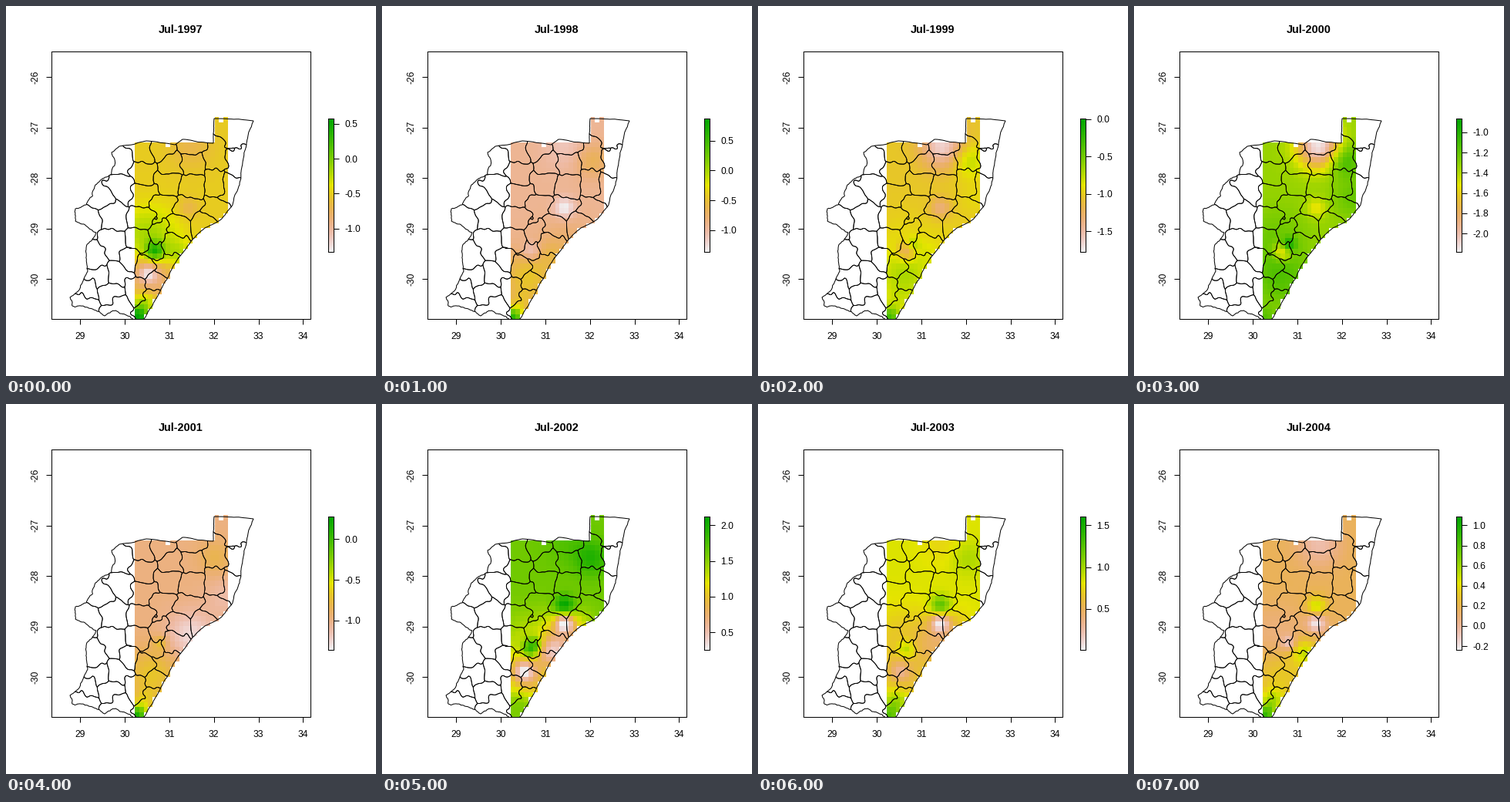
A matplotlib script for the animation above (8 s loop, 480 by 480 pixels).

```python
import colorsys
import math

import matplotlib.pyplot as plt
import numpy as np
from matplotlib.animation import FuncAnimation
from matplotlib.colors import ListedColormap
from matplotlib.patches import Polygon

SIZE = 480
PX = 0.75  # points per pixel at 96 dpi
BOX = (59, 59, 395, 406)  # map frame: left, top, right, bottom
YEARS = range(1997, 2005)

plt.rcParams["font.family"] = "Liberation Sans"
rng = np.random.default_rng(5)


def terrain(n=255):
    """White through peach and yellow to green."""
    cols = []
    for u in np.linspace(0, 1, n):
        if u < 0.5:
            t = u * 2
            cols.append(colorsys.hsv_to_rgb(t / 6, t, 0.95 - 0.05 * t))
        else:
            t = u * 2 - 1
            cols.append(colorsys.hsv_to_rgb((1 + t) / 6, 1, 0.9 - 0.25 * t))
    return ListedColormap(cols)


def pixel_axes(left, top, right, bottom):
    axes = fig.add_axes([left / SIZE, 1 - bottom / SIZE,
                         (right - left) / SIZE, (bottom - top) / SIZE])
    axes.tick_params(length=7 * PX, width=PX, labelsize=12 * PX)
    for spine in axes.spines.values():
        spine.set_linewidth(PX)
    return axes


def rough(pts, amp, passes=4):
    """Midpoint displacement, to give a line a surveyed look."""
    pts = np.asarray(pts, float)
    for _ in range(passes):
        step = np.diff(pts, axis=0)
        side = np.column_stack([-step[:, 1], step[:, 0]])
        mid = pts[:-1] + step / 2 + side * rng.normal(0, amp, (len(step), 1))
        out = np.empty((len(pts) + len(mid), 2))
        out[::2], out[1::2] = pts, mid
        pts = out
    return pts


def ripple(x, y, waves=14):
    """Smooth random displacement: a sum of sines in random directions."""
    total = np.zeros_like(x)
    for _ in range(waves):
        length = rng.uniform(8, 30)
        angle, phase = rng.uniform(0, 2 * math.pi, 2)
        along = x * math.cos(angle) + y * math.sin(angle)
        total += 0.045 * length * np.sin(2 * math.pi * along / length + phase)
    return total


fig = plt.figure(figsize=(5, 5), dpi=96, facecolor="white")
cmap = terrain()
cmap.set_bad("white")

ax = pixel_axes(*BOX)
title = fig.text(226.8 / SIZE, 1 - 35 / SIZE, "", fontsize=14.4 * PX,
                 weight="bold", ha="center", va="baseline")

bar = pixel_axes(418, 146, 425, 319)
bar.set_xticks([])
bar.yaxis.tick_right()
bar.tick_params(axis="y", pad=7 * PX)
ramp = bar.imshow(np.linspace(0, 1, 255)[:, None], cmap=cmap, origin="lower",
                  aspect="auto", interpolation="nearest")

# Province outline
north = [(147, 182), (163, 180), (182, 175), (219, 180), (229, 173),
         (269, 178), (270, 146), (321, 149)]
coast = [(321, 149), (312, 180), (305, 215), (303, 232), (294, 258), (280, 276),
         (258, 288), (241, 304), (217, 337), (199, 372), (178, 407)]
west = [(167, 407), (142, 395), (128, 402), (112, 393), (86, 389), (83, 378),
        (106, 344), (104, 316), (117, 294), (90, 279), (90, 263), (104, 258),
        (116, 232), (137, 218), (141, 207), (137, 190), (147, 182)]
edge = np.vstack([rough(north, 0.02), rough(coast, 0.03), rough(west, 0.08)])
province = Polygon(edge, fill=False, lw=PX, zorder=3)
ax.add_patch(province)

# Districts: land nearest to each centre, with rippled borders
centres = np.array([
    (150, 200), (122, 245), (150, 236), (104, 277), (141, 273), (140, 312),
    (114, 328), (118, 350), (143, 345), (104, 366), (100, 386), (138, 372),
    (142, 389), (160, 330), (176, 190), (202, 187), (240, 181), (213, 207),
    (243, 204), (273, 195), (296, 162), (300, 203), (270, 232), (290, 240),
    (243, 233), (208, 228), (178, 215), (178, 245), (200, 262), (236, 262),
    (270, 264), (225, 285), (256, 281), (178, 275), (196, 295), (172, 305),
    (192, 318), (216, 308), (178, 340), (204, 335), (192, 355), (172, 370),
    (185, 380)])
px, py = np.meshgrid(np.arange(78, 326, 1.5), np.arange(140, 410, 1.5))
wx, wy = px + ripple(px, py), py + ripple(px, py)
dist = np.hypot(wx - centres[:, 0, None, None], wy - centres[:, 1, None, None])
first, second = np.partition(dist, 1, axis=0)[:2]
for own in dist:
    rival = np.where(own == first, second, first)
    lines = ax.contour(px, py, own - rival, levels=[0], colors="black",
                       linewidths=0.9 * PX, zorder=3)
    lines.set_clip_path(province)

# Raster grid in pixels, cut along the coast
COLS, ROWS = 21, 40
LEFT, TOP, DX, DY = 167.3, 144.4, 5.76, 6.55
gx, gy = np.meshgrid(LEFT + DX * (np.arange(COLS) + 0.5),
                     TOP + DY * (np.arange(ROWS) + 0.5))
shore_x, shore_y = np.transpose(coast)
hidden = gx > np.interp(gy, shore_y, shore_x) + 1
hidden[:5, :18] = True
hidden[5, 7] = hidden[0, 19] = True

# Places where the field rises or dips: x, y, radius
spots = dict(north=(240, 182, 28), east=(272, 200, 22), corner=(285, 250, 25),
             dam=(237, 262, 13), ford=(237, 284, 11), shore=(240, 300, 30),
             mid=(185, 300, 38), town=(193, 318, 12), hill=(201, 310, 9),
             bay=(222, 322, 18), lower=(190, 352, 36), ridge=(184, 347, 12),
             foot=(180, 385, 15), tip=(170, 404, 13))


def field(base, **bumps):
    """Relative level, 0 lowest to 1 highest, on the raster grid."""
    level = np.full(gx.shape, base)
    for name, height in bumps.items():
        x, y, r = spots[name]
        level += height * np.exp(-((gx - x) ** 2 + (gy - y) ** 2) / r ** 2)
    return level.clip(0, 1)


# Each year: colour bar limits and field
data = {
    1997: (-1.336, 0.577, field(0.43, north=-.09, dam=-.1, mid=.2, town=.42,
                                bay=.15, lower=-.2, ridge=-.27, foot=.25, tip=.6)),
    1998: (-1.368, 0.874, field(0.19, north=-.08, east=.13, dam=-.2, shore=.06,
                                town=-.15, bay=.08, lower=.22, foot=.1, tip=.65)),
    2000: (-2.183, -0.863, field(0.64, north=-.62, east=.22, corner=.1, dam=-.16,
                                 mid=.08, town=-.3, hill=.3, lower=.14, tip=.12)),
    2001: (-1.365, 0.28, field(0.23, east=.1, corner=-.08, shore=-.18, hill=.14,
                               lower=.18, foot=.12, tip=.65)),
    2002: (0.252, 2.124, field(0.72, north=.06, east=.18, dam=.35, ford=-.5,
                               shore=-.4, mid=-.1, town=.4, hill=.15, bay=-.35,
                               lower=-.4, ridge=-.35, foot=.1)),
    2004: (-0.238, 1.088, field(0.31, north=-.17, dam=.24, ford=-.28, shore=-.03,
                                mid=-.08, hill=-.2, bay=.25, lower=.12, foot=.25,
                                tip=.5)),
}
for year in YEARS:
    if year not in data:
        pair = zip(data[year - 1], data[year + 1])
        data[year] = tuple((a + b) / 2 for a, b in pair)

raster = ax.imshow(np.zeros(gx.shape), cmap=cmap, vmin=0, vmax=1,
                   extent=(LEFT, LEFT + COLS * DX, TOP + ROWS * DY, TOP),
                   aspect="auto", interpolation="nearest", zorder=1)

# Degree labels
ax.set_xlim(BOX[0], BOX[2])
ax.set_ylim(BOX[3], BOX[1])
ax.set_xticks([96.3 + 57.8 * i for i in range(6)], [str(29 + i) for i in range(6)])
ax.set_yticks([92.2 + 65.5 * i for i in range(5)], [str(-26 - i) for i in range(5)],
              rotation=90, va="center")
ax.tick_params(axis="x", pad=10 * PX)
ax.tick_params(axis="y", pad=7.5 * PX)


def draw(i):
    year = YEARS[i]
    lo, hi, level = data[year]
    raster.set_data(np.ma.array(level, mask=hidden))
    title.set_text(f"Jul-{year}")
    ramp.set_extent((0, 1, lo, hi))
    bar.set_ylim(lo, hi)
    step = 0.2 if hi - lo < 1.5 else 0.5
    ticks = [k * step for k in range(math.ceil(lo / step), math.floor(hi / step) + 1)]
    bar.set_yticks(ticks, [f"{t:.1f}" for t in ticks])
    return raster, title, ramp


anim = FuncAnimation(fig, draw, frames=len(YEARS), interval=1000, repeat=True,
                     repeat_delay=0, blit=False)
plt.show()
```
